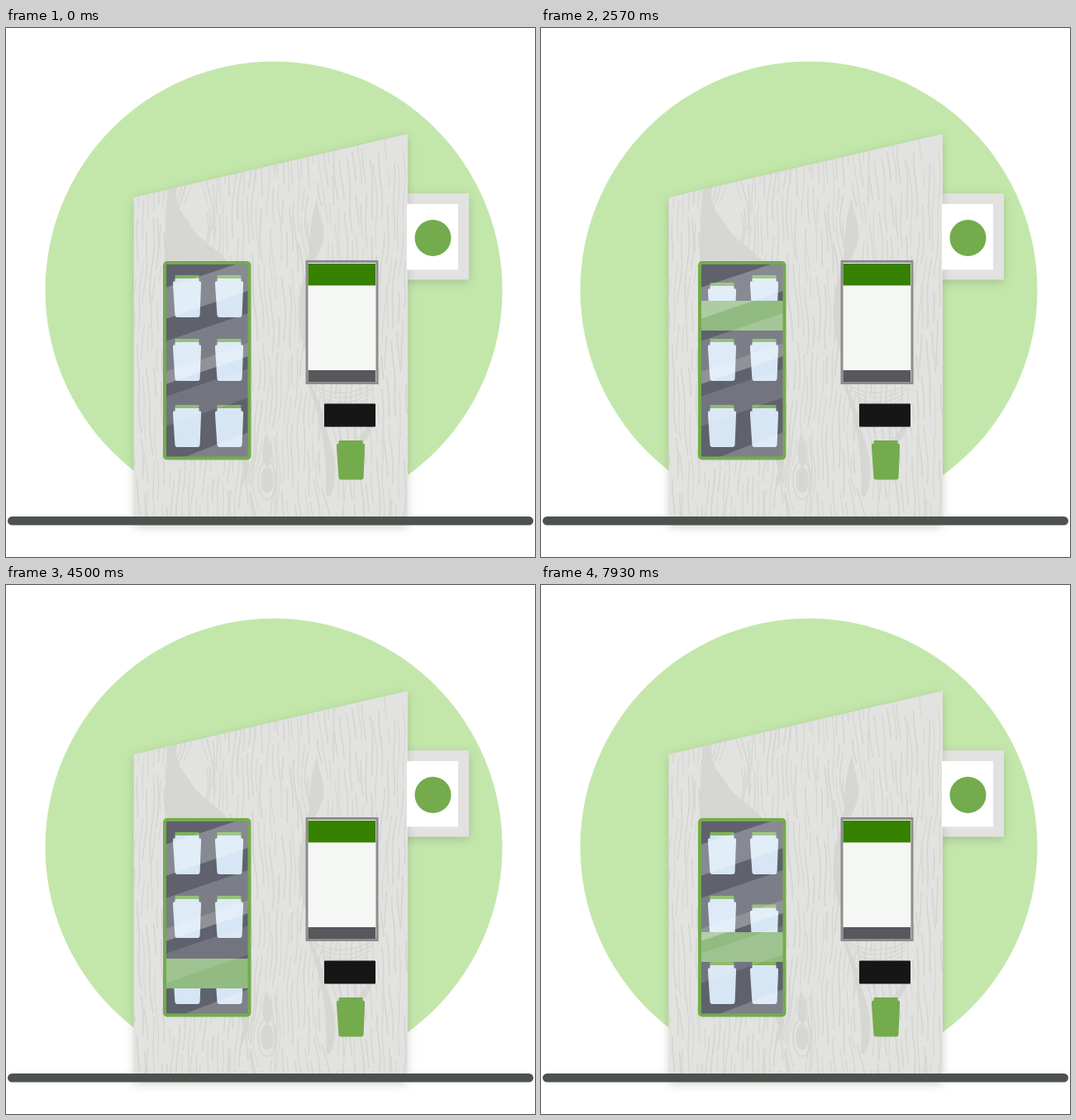
These frames come from a looping animation (640 by 640 pixels, 8000 ms). An HTML page:

```html
<!DOCTYPE html>
<html lang="en">
<head>
<meta charset="utf-8">
<title>Jar vending kiosk</title>
<style>
  html, body { margin: 0; width: 100%; height: 100%; overflow: hidden; background: #fff; }
  svg { display: block; width: 100%; height: 100%; }
  .shade { filter: drop-shadow(0 3px 6px rgba(60, 70, 50, .22)); }
</style>
</head>
<body>
<svg viewBox="0 0 640 640">
  <defs>
    <clipPath id="wallClip"><path d="M154.500 205L486 128V591H154.500Z"/></clipPath>
    <clipPath id="glassClip"><rect x="193" y="285" width="100" height="235"/></clipPath>
    <path id="jarBody" d="M2.500 0H31.500V3.500H33Q34 3.500 34 5V8L32.600 44Q32.400 47 29.500 47H5.500Q2.600 47 2.400 44L0 8V5Q0 3.500 1 3.500H2.500Z"/>
    <g id="jar">
      <rect x="2.500" width="29" height="4" rx=".8" fill="#7fb25c"/>
      <use href="#jarBody" y="4" fill="#d7e6f4"/>
    </g>
  </defs>

  <circle cx="324" cy="317" r="276.500" fill="#c3e7ab"/>

  <rect class="shade" x="480" y="200" width="80" height="104.500" fill="#e2e2e0"/>
  <path class="shade" d="M154.500 205L486 128V601H154.500Z" fill="#e2e2e0"/>
  <g clip-path="url(#wallClip)">
    <g id="patches" fill="#d6d6d2">
      <path d="M195 194C197 225 188 255 194 284H270C250 262 232 256 222 236C212 222 203 215 207 192Z"/>
      <path d="M376 206C380 232 390 246 380 268Q376 282 364 284C370 262 364 246 376 206Z"/>
      <path d="M361 300C349 335 352 368 365 398V300Z"/>
      <path d="M362 420Q380 446 386 482C396 510 402 530 396 556Q392 574 387 564C389 520 384 480 362 420Z"/>
      <path d="M447 470Q432 486 426 500H434Q442 490 447 470Z"/>
      <path d="M315 490C323 510 324 524 316 532C308 522 309 508 315 490Z"/>
      <path d="M282 520Q290 532 284 556Q296 542 294 520Z"/>
      <ellipse cx="316" cy="547" rx="6" ry="15"/>
    </g>
    <g id="grain" fill="none" stroke="#d5d5d1" stroke-linecap="round"></g>
  </g>

  <rect x="485" y="213" width="62" height="79.500" fill="#fff"/>
  <circle cx="516.500" cy="254" r="22" fill="#74ab4d"/>

  <rect x="364" y="282.500" width="85" height="147" fill="#f5f7f5" stroke="#8d8d8d" stroke-width="3"/>
  <rect x="365.500" y="285" width="81.500" height="26.500" fill="#368100"/>
  <rect x="365.500" y="414" width="81.500" height="14" fill="#58575c"/>
  <rect x="385" y="454.500" width="62" height="28" rx="1" fill="#161616"/>
  <g fill="#74ab4d">
    <rect x="403" y="499" width="28.500" height="5" rx="1"/>
    <use href="#jarBody" x="400" y="499.500"/>
  </g>

  <rect x="192" y="284" width="103" height="237" rx="4" fill="#5f626d"/>
  <g clip-path="url(#glassClip)">
    <g id="shelf"></g>
    <use id="cargo" href="#jar"/>
    <rect id="lift" x="189" width="104" height="36" fill="#91bb81"/>
    <g id="shine" fill="#fff"></g>
  </g>
  <rect x="192" y="284" width="102.500" height="236.500" rx="3" fill="none" stroke="#74ab4d" stroke-width="4"/>

  <rect x="2" y="591" width="636" height="10.500" rx="5.200" fill="#4d524f"/>
</svg>

<script>
const NS = 'http://www.w3.org/2000/svg';
const $ = id => document.getElementById(id);
const add = (parent, tag, attrs) => {
  const el = document.createElementNS(NS, tag);
  for (const name in attrs) el.setAttribute(name, attrs[name]);
  return parent.appendChild(el);
};

// Wood grain: broken vertical strands that bend around the knots
let seed = 29;
const rand = () => (seed = (seed * 16807) % 2147483647) / 2147483647;
const knots = [[316, 547, 15, 30], [225, 240, 26, 45], [376, 245, 14, 40], [394, 530, 14, 40]];
const bend = (x, y) => {
  let dx = 4 * Math.sin(y / 55 + x / 45) + 1.2 * Math.sin(y / 13 + x);
  for (const [cx, cy, rx, ry] of knots) {
    const side = x < cx ? -1 : 1;
    dx += side * rx * .7 * Math.exp(-(((x - cx) / rx) ** 2) - ((y - cy) / ry) ** 2);
  }
  return x + dx;
};
for (let x = 156; x < 488; x += 6.3) {
  let y = 125 + rand() * 40;
  while (y < 595) {
    const end = y + 25 + rand() * 85;
    const lane = x + rand() * 4 - 2;
    let d = '';
    for (let v = y; v <= end; v += 7) {
      d += (d ? 'L' : 'M') + bend(lane, v).toFixed(1) + ' ' + v.toFixed(1);
    }
    add($('grain'), 'path', { d, 'stroke-width': (1 + rand() * .9).toFixed(2) });
    y = end + 4 + rand() * 18;
  }
}
for (const r of [3, 7, 11]) {
  add($('grain'), 'ellipse', { cx: 316, cy: 547, rx: r, ry: r * 2.1, 'stroke-width': 1.5 });
}
for (let i = 0; i < 6; i++) {
  const y = 432 + i * 6;
  add($('grain'), 'path', { d: `M${372 + i * 4} ${y}Q${404 + i} ${y + 20} ${446 - i * 3} ${y - 2}`, 'stroke-width': 1.4 });
}

// Reflections: left top, right top, right bottom, left bottom, opacity
[
  [314, 281, 318, 352, .25],
  [379, 345, 381, 416, .18],
  [416, 381, 397, 431, .3],
  [446, 412, 447, 482, .12],
  [528, 489, 540, 575, .2]
].forEach(([a, b, c, d, opacity]) =>
  add($('shine'), 'path', { d: `M193 ${a}L293 ${b}V${c}L193 ${d}Z`, opacity }));

const rows = [299, 376, 456];
const cols = [202, 253];
const jars = rows.map(y => cols.map(x => add($('shelf'), 'use', { href: '#jar', x, y })));

// Motion, counted in ticks of 1/14 s
const TICK = 1000 / 14;
const LOOP = 8000;
const liftKeys = [
  [2, 522], [12, 433], [14, 419], [25, 321], [35, 321], [36, 330], [47, 418], [50, 445],
  [62, 445], [73, 522], [86, 522], [94, 462], [98, 433], [101, 409.5], [109, 409.5], [111, 420], [112, 426]
];
const track = (keys, k) => {
  if (k <= keys[0][0]) return keys[0][1];
  for (let i = 1; i < keys.length; i++) {
    const [k0, v0] = keys[i - 1], [k1, v1] = keys[i];
    if (k <= k1) return v0 + (v1 - v0) * (k - k0) / (k1 - k0);
  }
  return keys[keys.length - 1][1];
};
const easeInOut = p => p < .5 ? 2 * p * p : 1 - 2 * (1 - p) * (1 - p);
const show = (el, on) => el.setAttribute('visibility', on ? 'visible' : 'hidden');

function draw(ms) {
  const k = Math.floor((ms % LOOP + 5) / TICK);
  const y = track(liftKeys, k);
  $('lift').setAttribute('y', y);

  const first = k >= 36 && k < 59;
  const second = k >= 110;
  show($('cargo'), first || second);
  show(jars[0][0], !(k >= 36 && k < 49));
  show(jars[1][1], !second);

  const slide = 95 * easeInOut(Math.min(1, Math.max(0, (k - 49) / 10)));
  $('cargo').setAttribute('x', second ? cols[1] : cols[0] + slide);
  $('cargo').setAttribute('y', second ? y - 33.5 : y - 22);
}

const start = performance.now();
function loop() {
  draw(performance.now() - start);
  requestAnimationFrame(loop);
}
loop();
</script>
</body>
</html>
```
